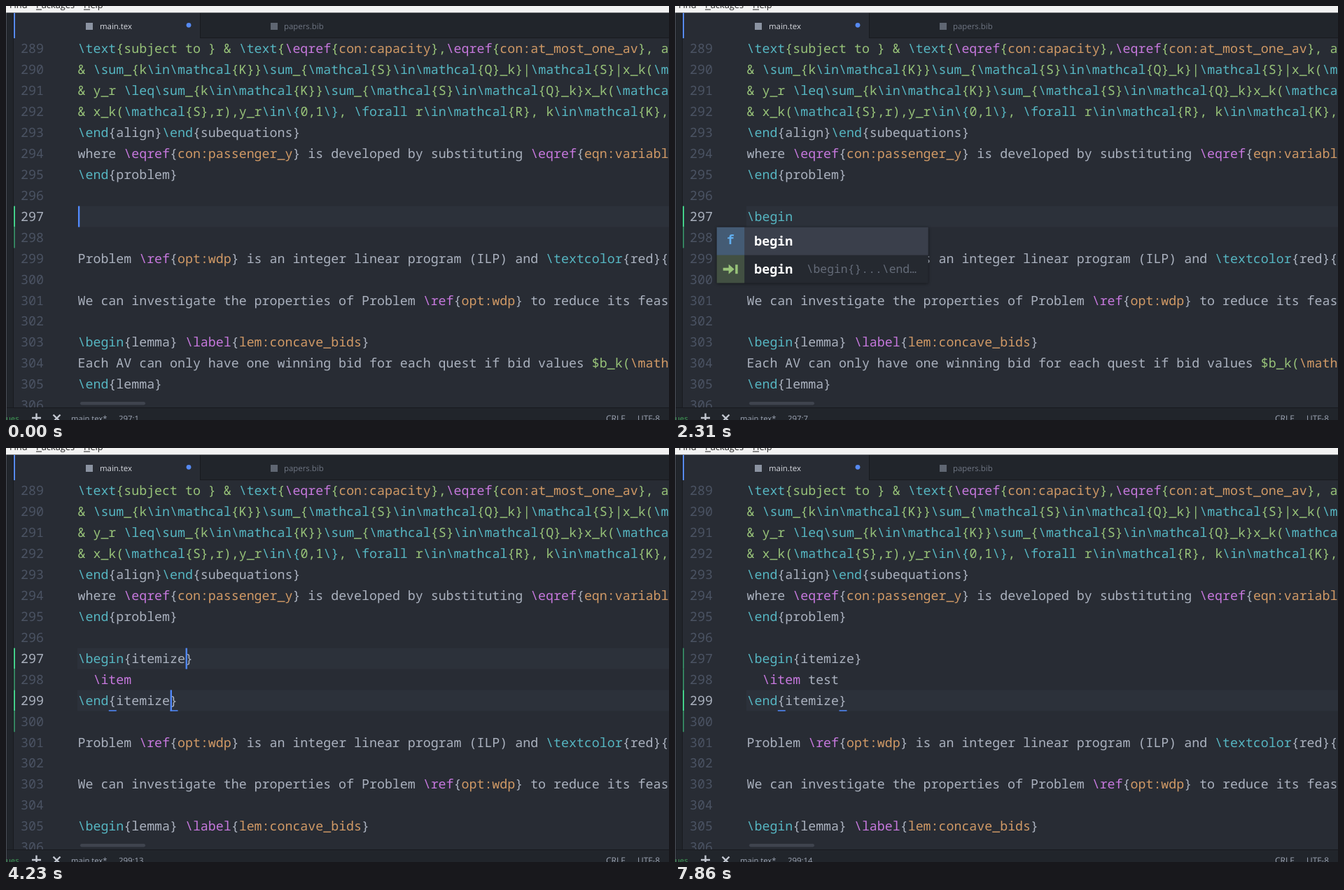
Recreate the animation shown at these times as an HTML page. Size 947 px wide and 591 px high, loop 8 s.

```html
<!DOCTYPE html>
<html lang="en">
<head>
<meta charset="utf-8">
<title>Editor autocomplete</title>
<style>
  html, body { margin: 0; width: 100%; height: 100%; overflow: hidden; background: #282c34; }
  svg { display: block; width: 947px; height: 591px; }
  text { white-space: pre; text-rendering: geometricPrecision; }
  .code { font: 18.28px "Noto Sans Mono", "DejaVu Sans Mono", monospace; }
  .ui { font-family: "Open Sans", "Noto Sans", sans-serif; }
  .popup { filter: drop-shadow(0 1px 2px rgba(0, 0, 0, .45)); }
  .match { font-weight: 700; fill: #fff; }
  .kind { font-weight: 700; fill: #61afef; text-anchor: middle; }
  .hint { font-size: 16.4px; fill: #656c79; }
</style>
</head>
<body>
<svg id="stage" viewBox="0 0 947 591"></svg>
<script>
const LOOP = 8000, LEFT = 102.5, CHAR = 10.97, PITCH = 29.93, ITEM = 39.8;
const GRAY = '#abb2bf', CYAN = '#56b6c2', PURPLE = '#c678dd', ORANGE = '#d19a66',
      GREEN = '#98c379', BLUE = '#528bff', RED = '#e06c75', DARK = '#21252b', EDGE = '#181a1f';

const colX = col => LEFT + col * CHAR;
const rowY = row => 285.6 + (row - 297) * PITCH;
const escape = s => s.replace(/&/g, '&amp;').replace(/</g, '&lt;');
const rect = (x, y, w, h, fill, more = '') =>
  `<rect x="${x}" y="${y}" width="${w}" height="${h}" fill="${fill}" ${more}/>`;
const path = (d, more) => `<path d="${d}" ${more}/>`;
const span = (s, fill) => `<tspan fill="${fill}">${escape(s)}</tspan>`;
const code = (x, y, inner, more = '', type = '') =>
  `<text class="code ${type}" x="${x}" y="${y}" ${more}>${inner}</text>`;
const ui = (x, y, size, fill, s) =>
  `<text class="ui" x="${x}" y="${y}" font-size="${size}" fill="${fill}">${escape(s)}</text>`;

const before = String.raw`\text{subject to } & \text{\eqref{con:capacity},\eqref{con:at_most_one_av}, and
& \sum_{k\in\mathcal{K}}\sum_{\mathcal{S}\in\mathcal{Q}_k}|\mathcal{S}|x_k(\mathcal
& y_r \leq\sum_{k\in\mathcal{K}}\sum_{\mathcal{S}\in\mathcal{Q}_k}x_k(\mathcal
& x_k(\mathcal{S},r),y_r\in\{0,1\}, \forall r\in\mathcal{R}, k\in\mathcal{K},
\end{align}\end{subequations}
where \eqref{con:passenger_y} is developed by substituting \eqref{eqn:variables}
\end{problem}
`.split('\n');
const after = String.raw`Problem \ref{opt:wdp} is an integer linear program (ILP) and \textcolor{red}{

We can investigate the properties of Problem \ref{opt:wdp} to reduce its feasible

\begin{lemma} \label{lem:concave_bids}
Each AV can only have one winning bid for each quest if bid values $b_k(\mathcal
\end{lemma}
`.split('\n');

function highlight(line, base = GRAY, command = CYAN) {
  const dollar = line.indexOf('$');
  if (dollar >= 0)
    return highlight(line.slice(0, dollar)) + span('$', GREEN) + highlight(line.slice(dollar + 1), GREEN, ORANGE);
  const token = /(\\(?:eqref|ref|label))(\{)([^}]*)|(\\item\b)|(\\(?:[a-z]+|[{}]))|([^\\]+|\\)/gi;
  return [...line.matchAll(token)].map(([, ref, brace, key, item, cmd, plain]) =>
    ref ? span(ref, PURPLE) + span(brace, base) + span(key, ORANGE)
    : item ? span(item, PURPLE)
    : cmd ? span(cmd, command)
    : span(plain, plain === '\\' ? command : base)).join('');
}

// Popups: left text column, row they hang under, width, scroll thumb height, matched prefix, entries
const list = (col, row, width, thumb, prefix, kind, names) => ({ col, row, width, thumb, prefix, kind, names });
const commands = (...args) => list(1, 297, ...args);
const environments = (...args) => list(5, 299, ...args);
const slashList = commands(269, 30, '', 'f', ['begin', 'ref', 'eqref', 'label', 'mathcal']);
const bList = commands(434, 60, 'b', 'f', ['begin', 'beta', 'label', 'mathbb', 'textbf']);
const beList = commands(401, 159, 'be', 'f', ['begin', 'beta', 'label', 'pagenumbering', 'CLUBmembership']);
const beginList = prefix => commands(302, 0, prefix, 'f', ['begin', 'begin']);
const iList = environments(412, 31, 'i', 'tag', ['align', 'align*', 'alignat', 'alignat*', 'description']);
const iteList = environments(222, 0, 'ite', 'tag', ['itemize']);

// Editor states
const typing = (text, popup, on = true) =>
  ({ body: [text, ''], carets: [[297, text.length]], popup, on });
const block = (name, item = '') => [`\\begin{${name}}`, item, `\\end{${name}}`, ''];
const naming = (name, popup, on = true, item) =>
  ({ body: block(name, item), carets: [[297, 7 + name.length], [299, 5 + name.length]], popup, on });
const filling = (text, row, col, on = true, selected = false) =>
  ({ body: block('itemize', '  \\item ' + text), carets: [[row, col]], on, selected });

const steps = [
  [0, typing('')],
  [410, typing('\\')],
  [610, typing('\\', slashList)],
  [810, typing('\\', slashList, false)],
  [1020, typing('\\b', bList)],
  [1220, typing('\\be', beList)],
  [1660, typing('\\beg', beginList('beg'))],
  [1870, typing('\\begin', beginList('begin'))],
  [2310, typing('\\begin', beginList('begin'), false)],
  [2520, naming('')],
  [2940, naming('', null, false)],
  [3370, naming('i', iList)],
  [3580, naming('ite', iteList)],
  [4020, naming('ite', iteList, false)],
  [4230, naming('itemize', null, true, '  \\item ')],
  [4660, naming('itemize', null, false, '  \\item ')],
  [5090, filling('', 298, 8, false, true)],
  [5510, filling('', 298, 8)],
  [5940, filling('t', 298, 9)],
  [6150, filling('tes', 298, 11)],
  [6380, filling('test', 298, 12)],
  [6790, filling('test', 298, 12, false)],
  [7000, filling('test', 299, 12)],
  [7430, filling('test', 299, 13)],
  [7860, filling('test', 299, 13, false)]
];

function drawEditor({ body, carets, on, selected }) {
  const active = carets.map(c => c[0]);
  let out = '';
  if (!selected) for (const row of active) out += rect(102, rowY(row), 845, PITCH, '#2c313a');
  else out += rect(colX(2), rowY(298), 6 * CHAR, PITCH, '#3e4451');

  [...before, ...body, ...after].slice(0, 18).forEach((line, i) => {
    const row = 289 + i, y = rowY(row) + 21.2;
    out += code(54, y, row, `text-anchor="end" fill="${active.includes(row) ? GRAY : '#4b5363'}"`);
    if (line) out += code(LEFT, y, highlight(line, i < 4 ? GREEN : GRAY));
  });
  body.forEach((_, i) => {
    out += rect(11, rowY(297 + i), 2, PITCH, active.includes(297 + i) ? '#43d08a' : '#35815f');
  });
  if (active.includes(299))
    for (const col of [4, body[2].length - 1])
      out += rect(colX(col) + .4, 374.2, CHAR, 1.5, BLUE);
  if (on) for (const [row, col] of carets) out += rect(colX(col) + .5, rowY(row), 2.3, PITCH, BLUE);
  return out + rect(102, 561, 845, 13, '#282c34') + rect(106, 565, 93, 4.5, '#3f444e', 'rx="2.2"');
}

function drawChrome({ carets, selected }) {
  const [row, col] = carets[carets.length - 1];
  return rect(0, 0, 10, 591, DARK) + rect(10, 10, 1, 563, EDGE) + rect(0, 0, 1, 591, '#4b4f57')
    + rect(11, 9, 267, 37, '#282c34') + rect(278, 9, 669, 37, DARK)
    + rect(277, 10, 1, 36, EDGE) + rect(278, 45, 669, 1, EDGE) + rect(11, 10, 2, 36, '#568af2')
    + rect(114, 24, 10, 10, '#8b93a1') + ui(134, 33, 11.4, '#d7dae0', 'main.tex')
    + `<circle cx="261" cy="27.3" r="3.4" fill="#568af2"/>`
    + rect(378, 24, 10, 10, '#5f6672') + ui(397, 33, 11.4, '#6f7683', 'papers.bib')
    + rect(0, 0, 947, 9.5, '#f2f2f2')
    + ui(5, 3.4, 12.8, '#222', 'Find') + ui(43, 3.4, 12.8, '#222', 'Packages') + ui(111, 3.4, 12.8, '#222', 'Help')
    + rect(43, 4.6, 8, 1, '#222') + rect(111, 4.6, 9, 1, '#222')
    + rect(1, 573, 946, 18, DARK) + rect(1, 573, 946, 1, EDGE)
    + ui(0, 593, 11.2, '#3f9f57', 'ues')
    + path('M37 588h13M43.5 581.5v13M67.5 583.5l10 10m0-10l-10 10', 'stroke="#c3c8d1" stroke-width="2.4"')
    + ui(93, 593, 11.2, '#9da5b4', 'main.tex*')
    + ui(161, 593, 11.4, '#9da5b4', `${row}:${col + 1}`)
    + (selected ? ui(203, 593, 11.4, '#9da5b4', '(1, 6)') : '')
    + ui(857, 593, 12, '#9da5b4', 'CRLF') + ui(902, 593, 11.9, '#9da5b4', 'UTF-8');
}

const icons = {
  f: ['#61afef', (x, y) => code(x + 19.5, y + 24.5, 'f', '', 'kind')],
  tag: [RED, (x, y) => path(`M${x + 17} ${y + 13.5}l-5.5 5.5 5.5 5.5m5-11l5.5 5.5-5.5 5.5`,
    `fill="none" stroke="${RED}" stroke-width="2.4"`)],
  snippet: [GREEN, (x, y) => path(`M${x + 9} ${y + 18.2}h8v-5l8 7-8 7v-5h-8zM${x + 26.5} ${y + 13.5}h3.5v13h-3.5z`,
    `fill="${GREEN}"`)]
};

function drawPopup({ col, row, width, thumb, prefix, kind, names }) {
  const x = colX(col) - 53.8, y = rowY(row + 1) + .3;
  let out = rect(x, y, width, names.length * ITEM, '#252930', 'rx="2"');
  names.forEach((name, i) => {
    const top = y + i * ITEM, base = top + 26, second = name === names[i - 1];
    const [tint, icon] = icons[second ? 'snippet' : kind];
    const at = name.indexOf(prefix), end = at + prefix.length;
    if (!i) out += rect(x, top, width - (thumb ? 11 : 0), ITEM, '#3a3f4b');
    out += rect(x, top, 39.5, ITEM, tint, 'fill-opacity=".25"') + icon(x, top);
    out += code(x + 53.7, base, name.slice(0, at) + `<tspan class="match">${name.slice(at, end)}</tspan>`
      + name.slice(end), `fill="${i ? '#9da5b4' : '#d7dae0'}"`);
    if (second) out += code(x + 128, base - .8, '\\begin{}...\\end…', '', 'hint');
  });
  if (thumb) out += rect(x + width - 8, y + 3, 5, thumb, '#3b404b', 'rx="2.5"');
  return `<g class="popup">${out}</g>`;
}

const stage = document.getElementById('stage'), start = performance.now();
let shown = null;
function tick() {
  const time = (performance.now() - start) % LOOP;
  const state = steps.filter(([at]) => at <= time).pop()[1];
  if (state !== shown) {
    shown = state;
    stage.innerHTML = rect(0, 0, 947, 591, '#282c34') + drawEditor(state) + drawChrome(state)
      + (state.popup ? drawPopup(state.popup) : '');
  }
  requestAnimationFrame(tick);
}
tick();
</script>
</body>
</html>
```
